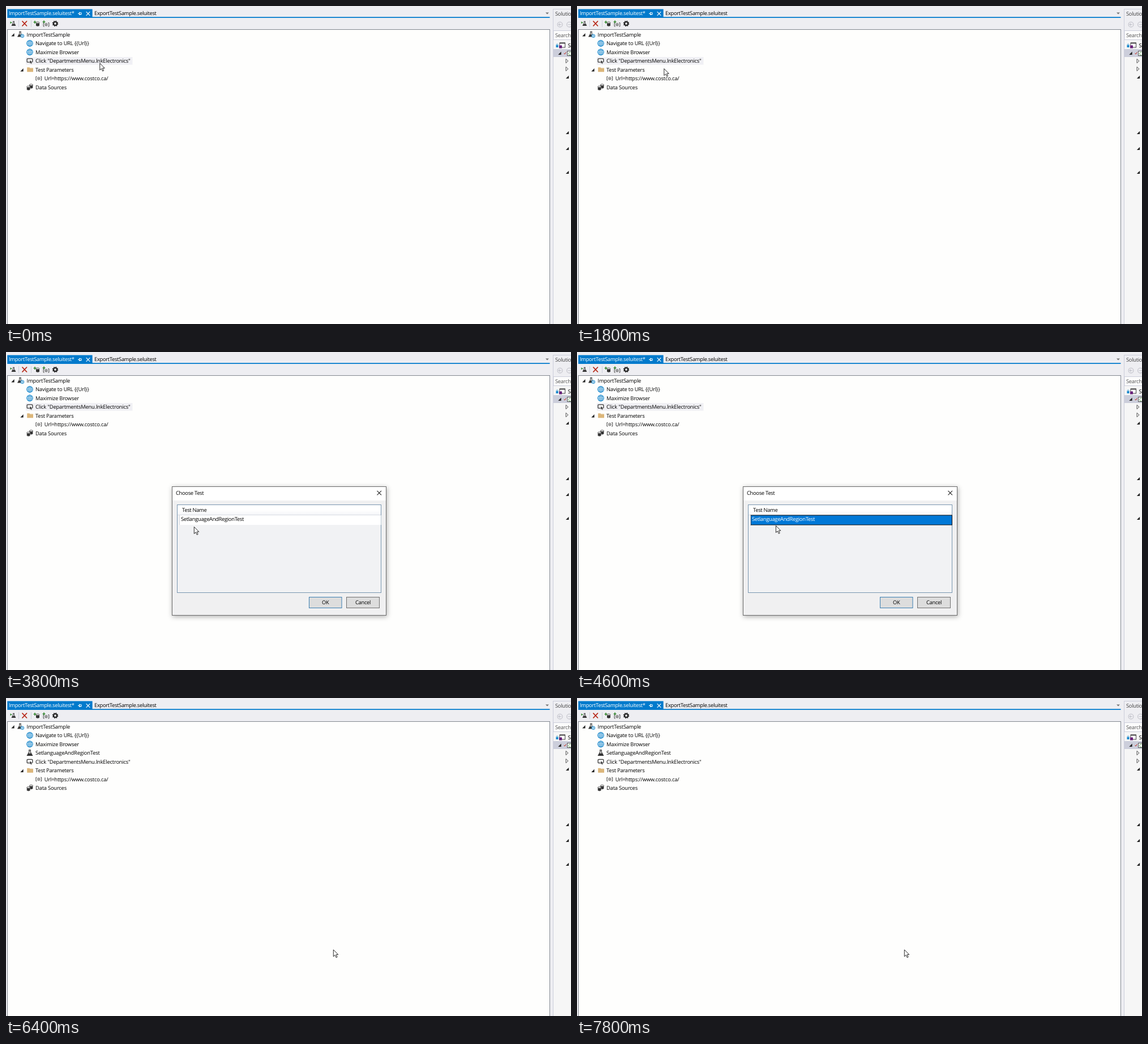
An HTML page that plays this animation: 998x561 px, repeating every 8000 ms.

```html
<!DOCTYPE html>
<html lang="en">
<head>
<meta charset="utf-8">
<title>Insert a test</title>
<style>
  html, body { margin: 0; width: 100%; height: 100%; overflow: hidden; background: #eeeef2; }
  svg { display: block; width: 100vw; height: 100vh; }
  text {
    font: 9.36px "Open Sans", "Noto Sans", sans-serif;
    letter-spacing: -.3px; fill: #000;
    text-rendering: geometricPrecision; white-space: pre;
  }
  #tree text { letter-spacing: -.19px; }
  .light { fill: #fff; }
  .line { fill: none; stroke: #333; }
</style>
</head>
<body>
<svg viewBox="0 0 998 561">
  <defs>
    <filter id="shadow" x="-10%" y="-10%" width="120%" height="120%">
      <feDropShadow dx="1" dy="2" stdDeviation="4" flood-opacity=".32"/>
    </filter>
    <linearGradient id="header" x2="0" y2="1">
      <stop offset=".5" stop-color="#fff"/><stop offset="1" stop-color="#f4f5f8"/>
    </linearGradient>
    <!-- Icons are centred on 0,0 -->
    <g id="globe">
      <circle r="5.3" fill="#fff" stroke="#1787cb" stroke-width="1.1"/>
      <path d="M-5 0H5M0-5V5M-4.2-2.8H4.2M-4.2 2.8H4.2" class="line" style="stroke:#1787cb" stroke-width=".8"/>
      <ellipse rx="2.6" ry="5.2" class="line" style="stroke:#1787cb" stroke-width=".8"/>
    </g>
    <g id="flask">
      <path d="M-2-5H2M-1.2-5V-1.4L-4.5 4.6H4.5L1.2-1.4V-5" class="line" stroke-width="1.2"/>
      <path d="M-2.3 .7H2.3L4.8 4.9H-4.8Z" fill="#333"/>
    </g>
    <g id="root">
      <use href="#flask" transform="translate(-1 -.6) scale(.9)"/>
      <circle cx="2.8" cy="2.5" r="2.9" fill="#fff" stroke="#1787cb"/>
      <path d="M0 2.5H5.6M2.8-.3V5.3" stroke="#1787cb" stroke-width=".7"/>
    </g>
    <g id="click">
      <rect x="-4.8" y="-4" width="9.6" height="6.4" rx="1" fill="#fff" stroke="#333" stroke-width="1.3"/>
      <path d="M0-1.5V5L1.6 3.6 2.7 5.7 4 5 3 3H5Z" fill="#333" stroke="#fff" stroke-width=".5"/>
    </g>
    <g id="folder">
      <path d="M-5.3-4H-1L0-2.8H5.5V4H-5.3Z" fill="#dcb67a"/>
      <path d="M-.2-3.1H4.8" stroke="#f0dfc0" stroke-width=".8"/>
    </g>
    <g id="param">
      <path d="M-3.3-3.2H-4.9V3.2H-3.3M3.3-3.2H4.9V3.2H3.3" class="line" stroke-width=".9"/>
      <circle r="2.3" class="line" stroke-width=".8"/><circle r=".9" fill="#333"/>
    </g>
    <g id="drum">
      <path d="M-3-2.6V2.8Q0 4.6 3 2.8V-2.6Z" fill="#333"/>
      <ellipse cy="-2.6" rx="3" ry="1.3" fill="#fff" stroke="#333" stroke-width=".8"/>
    </g>
    <g id="data">
      <use href="#drum" x="2.4" y="-1.6"/>
      <use href="#drum" x="-2.3" y="1.7" stroke="#fff" stroke-width=".3"/>
    </g>
    <path id="plus" d="M-2.4 0H2.4M0-2.4V2.4" stroke="#388a34" stroke-width="1.6"/>
    <path id="open" d="M2.6-2.7V2.6H-2.7Z" fill="#222"/>
    <path id="closed" d="M-2-3.6 2 0-2 3.6Z" fill="none" stroke="#444" stroke-width=".9"/>
  </defs>

  <rect width="998" height="561" fill="#eeeef2"/>

  <!-- Tabs -->
  <path d="M2.3 5.4H152.6V19.3H960.5V21H2.3Z" fill="#007acc"/>
  <text x="5" y="16.3" class="light">ImportTestSample.seluitest*</text>
  <text x="156" y="15.6">ExportTestSample.seluitest</text>
  <path d="M127 13.4H129.4M129.5 10.8V16M129.5 11.7H133V15H129.5M129.5 14.5H133" class="line" style="stroke:#fff"/>
  <path d="M141.7 10.2 148.3 16.8M148.3 10.2 141.7 16.8" stroke="#fff" stroke-width="1.2"/>
  <path d="M953 11.5H959L956 14.5Z" fill="#717171"/>

  <!-- Toolbar -->
  <use href="#flask" transform="translate(13.5 31) scale(.75)"/>
  <path d="M7.5 27.3 11 29.3 7.5 31.3Z" fill="#388a34"/>
  <path d="M22.5 25V37M44.5 25V37" stroke="#cccedb"/>
  <path d="M28.5 26.5 37 35.5M37 26.5 28.5 35.5" stroke="#b5200d" stroke-width="1.7"/>
  <use href="#drum" x="56" y="32"/><use href="#plus" x="51" y="28.5"/>
  <use href="#param" x="71" y="32.8"/><use href="#plus" x="67" y="28"/>
  <circle cx="87" cy="31" r="3" fill="none" stroke="#222" stroke-width="2.2"/>
  <circle cx="87" cy="31" r="4.5" fill="none" stroke="#222" stroke-width="1.5" stroke-dasharray="1.8 1.734"/>

  <!-- Test tree -->
  <rect x="2.5" y="41.5" width="958" height="530" fill="#fefefd" stroke="#828790"/>
  <g id="tree"></g>

  <!-- Side panel -->
  <g id="side">
    <rect x="966.5" y="5.5" width="40" height="570" fill="#f6f6f6" stroke="#cccedb"/>
    <rect x="967" y="6" width="31" height="37" fill="#eeeef2"/>
    <text x="970" y="17.2" style="fill:#444">Solution Explorer</text>
    <g fill="none" stroke="#c0c1c9" stroke-width="1.1">
      <circle cx="978.5" cy="32.7" r="4.4"/><circle cx="995" cy="32.7" r="4.4"/>
      <path d="M981 32.7H976.3M978.2 30.7 976.2 32.7 978.2 34.7M992.5 32.7H998"/>
    </g>
    <rect x="967" y="43.5" width="40" height="16" fill="#fcfcfc" stroke="#cccedb"/>
    <text x="970" y="55.3" style="fill:#555">Search Solution</text>
    <rect x="967" y="76" width="31" height="14" fill="#cccedb"/>
    <rect x="971.5" y="69" width="4" height="4" fill="#1787cb"/>
    <path d="M972.3 69V67.6Q973.5 66 974.7 67.6V69" class="line" style="stroke:#1787cb" stroke-width=".8"/>
    <rect x="978" y="65" width="9.5" height="8" fill="#fff" stroke="#444"/>
    <path d="M978 65.5H987.5" stroke="#444" stroke-width="1.8"/>
    <rect x="977" y="69.5" width="5" height="5" fill="#68217a"/>
    <text x="992.5" y="72.5">Solution</text>
    <path d="M985.7 83.5 987 85 989.3 81.4" class="line" style="stroke:#c22b1c"/>
    <rect x="991.5" y="79.5" width="12" height="8" fill="#fff" stroke="#555"/>
    <text x="993" y="86.5" style="font-size:8px;fill:#388a34">C#</text>
  </g>

  <!-- Dialog -->
  <g id="dialog">
    <rect x="293.5" y="237.5" width="378" height="227" fill="#f0f0f1" stroke="#6b6b6b" filter="url(#shadow)"/>
    <rect x="294" y="238" width="377" height="24" fill="#fff"/>
    <text x="300" y="252.3">Choose Test</text>
    <path d="M655.5 244.8 663 252.3M663 244.8 655.5 252.3" stroke="#222" stroke-width="1.1"/>
    <rect x="302.5" y="269.5" width="360" height="155" fill="#f1f2f4" stroke="#7896b0"/>
    <rect x="303" y="270" width="359" height="17.5" fill="url(#header)"/>
    <path d="M303 287.5H662" stroke="#d8dce3"/>
    <text x="311" y="282.3">Test Name</text>
    <rect id="choice" x="307" y="288" width="355.5" height="17" fill="#fff"/>
    <path d="M306.5 288V305" stroke="#d4d8de"/>
    <text id="choiceText" x="309" y="298">SetlanguageAndRegionTest</text>
    <rect id="ok" x="535.5" y="432.5" width="57.5" height="19" stroke="#3c7fb1"/>
    <text x="564.3" y="445.4" text-anchor="middle">OK</text>
    <rect x="601.5" y="432.5" width="58" height="19" fill="#ddd" stroke="#707070"/>
    <text x="630.5" y="445.4" text-anchor="middle">Cancel</text>
  </g>

  <path id="cursor" d="M.3 .5V12.6L3.1 9.9 5.2 14.4 7.1 13.5 5.1 9.2H8.8Z" fill="#fff" stroke="#111" stroke-width=".9"/>
</svg>
<script>
const LOOP = 8000, STEP = 200, ROW = 15.5, TOP = 50.3;
const $ = id => document.getElementById(id);
const set = (id, attrs) => {
  for (const name in attrs) $(id).setAttribute(name, attrs[name]);
};
const show = (id, on) => set(id, { visibility: on ? 'visible' : 'hidden' });
const icon = (name, x, y) => `<use href="#${name}" x="${x}" y="${y}"/>`;

// Icon, icon x, label x, label, expander x
const before = [
  ['root', 26, 36.5, 'ImportTestSample', 12],
  ['globe', 42, 52, 'Navigate to URL {{Url}}'],
  ['globe', 42, 52, 'Maximize Browser'],
];
const after = [
  ['click', 42, 52, 'Click "DepartmentsMenu.lnkElectronics"'],
  ['folder', 42.5, 52, 'Test Parameters', 28],
  ['param', 57.8, 67.8, 'Url=https://www.costco.ca/'],
  ['data', 42, 52, 'Data Sources'],
];
const rowMarkup = ([name, ix, tx, label, ex], i) => {
  const y = TOP + i * ROW;
  return (ex ? icon('open', ex, y + .5) : '') + icon(name, ix, y)
    + `<text x="${tx}" y="${y + 3.3}">${label}</text>`;
};
$('tree').innerHTML =
  '<rect id="mark" x="35" y="90" width="188.5" height="13.5"/>'
  + before.map(rowMarkup).join('')
  + `<g id="inserted">${rowMarkup(['flask', 42, 52, 'SetlanguageAndRegionTest'], 3)}</g>`
  + `<g id="after">${after.map((row, i) => rowMarkup(row, i + 3)).join('')}</g>`;
const clickText = $('after').querySelector('text');

$('side').insertAdjacentHTML('beforeend',
  icon('open', 978, 83.3)
  + [97, 111].map(y => icon('closed', 991, y)).join('')
  + [125.5, 223.5, 251.5, 293.5].map(y => icon('open', 991.5, y)).join(''));

// Pointer stops: time, x, y
const stops = [
  [0, 165.5, 100.5], [800, 137.5, 99.5], [1400, 137.5, 99.5], [2400, 183, 129.5],
  [2600, 183, 129.5], [3800, 332, 308], [4000, 333, 295], [4400, 333, 295],
  [5600, 577, 443.5], [5800, 578, 443.5], [LOOP, 578, 443.5],
];
function pointer(t) {
  const i = stops.findIndex(stop => stop[0] > t);
  const [t0, x0, y0] = stops[i - 1], [t1, x1, y1] = stops[i];
  const p = (t - t0) / (t1 - t0), e = p * p * (3 - 2 * p);
  return [x0 + (x1 - x0) * e, y0 + (y1 - y0) * e];
}

function draw(t) {
  const [x, y] = pointer(t);
  const focused = t >= 800 && t < 1800;
  const chosen = t >= 4200;
  const done = t >= 6400;
  const overOk = x > 535 && x < 593 && y > 432 && y < 452;

  set('cursor', { transform: `translate(${x} ${y})` });
  set('mark', { fill: focused ? '#0078d7' : '#f0f0f4' });
  clickText.style.fill = focused ? '#fff' : '';
  show('mark', !done);
  show('inserted', done);
  set('after', { transform: `translate(0 ${done ? ROW : 0})` });
  show('dialog', t >= 3000 && !done);
  set('choice', { fill: chosen ? '#0078d7' : '#fff', stroke: chosen ? '#111' : 'none' });
  $('choiceText').style.fill = chosen ? '#fff' : '';
  set('ok', { fill: overOk ? '#bee6fd' : '#ddd' });
}

const start = performance.now();
function tick() {
  const t = (performance.now() - start) % LOOP;
  draw(Math.floor(t / STEP) * STEP);
  requestAnimationFrame(tick);
}
tick();
</script>
</body>
</html>
```
